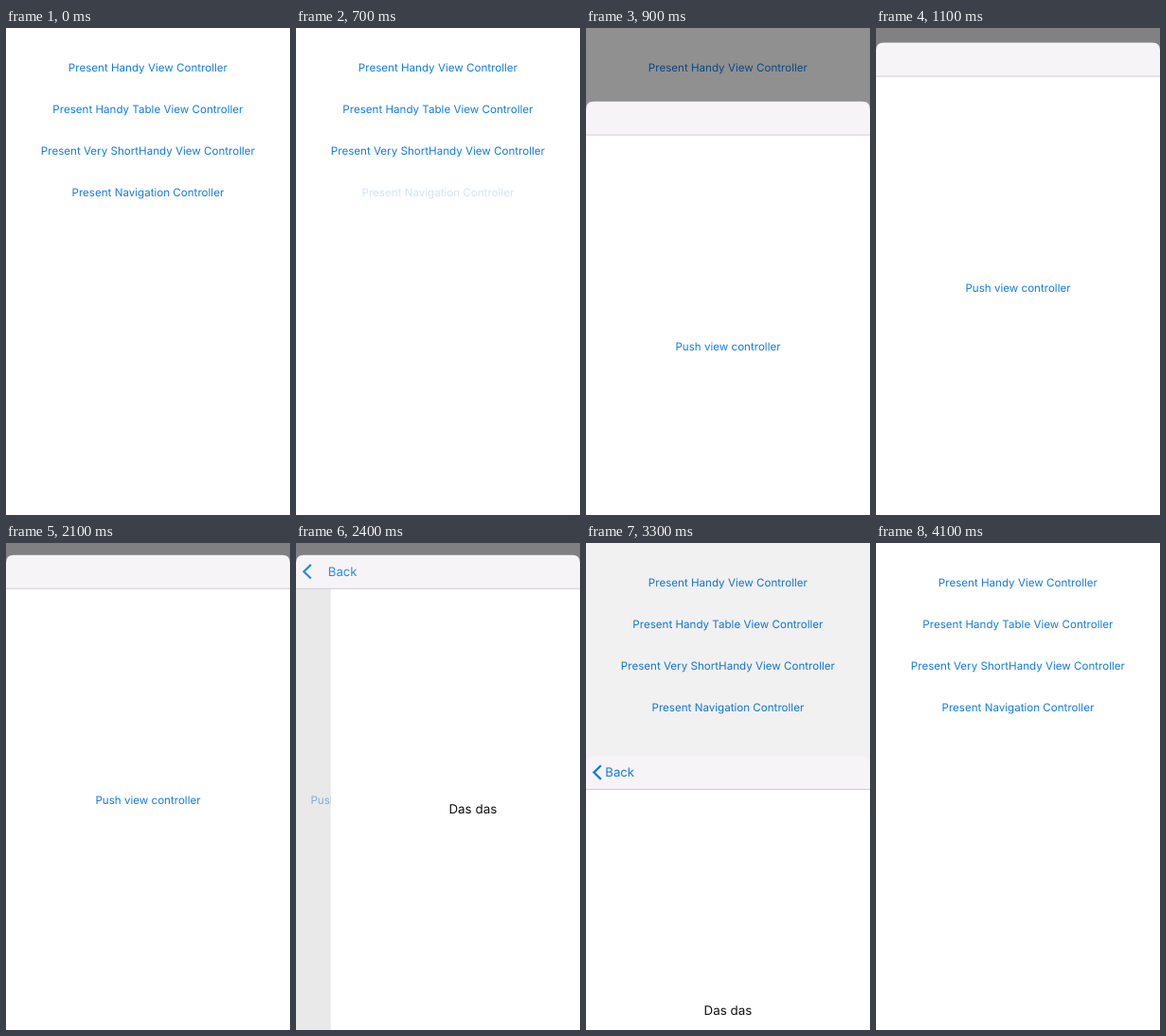
An HTML page for the animation above (4400 ms loop, 300 by 515 pixels).

```html
<!DOCTYPE html>
<html lang="en">
<head>
<meta charset="utf-8">
<title>Sheet presentation</title>
<style>
  html, body { margin: 0; width: 100%; height: 100%; overflow: hidden; background: #fff; }
  svg { display: block; width: 100%; height: 100%; }
  text { font: 11.6px Inter, "Liberation Sans", sans-serif; fill: #147ce0; text-rendering: geometricPrecision; }
  .link { text-anchor: middle; }
  #back { font-size: 13.2px; }
  #detail text { font-size: 13.4px; fill: #111; }
</style>
</head>
<body>
<svg viewBox="0 0 300 515">
  <rect width="300" height="515" fill="#fff"/>
  <text class="link" x="149.9" y="45.6">Present Handy View Controller</text>
  <text class="link" x="149.9" y="89.6">Present Handy Table View Controller</text>
  <text class="link" x="149.9" y="133.6">Present Very ShortHandy View Controller</text>
  <text class="link" x="149.9" y="177.6" id="present">Present Navigation Controller</text>
  <rect id="dim" width="300" height="515" fill="#020004"/>

  <g id="sheet">
    <path d="M0 540V8Q0 0 8 0H292Q300 0 300 8V540Z" fill="#f6f4f7"/>
    <rect y="35.8" width="300" height="504" fill="#fff"/>
    <g id="root">
      <text class="link" x="150" y="263.5" id="push">Push view controller</text>
    </g>
    <rect id="shade" y="35.8" width="300" height="504"/>
    <g id="detail">
      <rect y="35.8" width="300" height="504" fill="#fff"/>
      <text class="link" x="150" y="273.5">Das das</text>
    </g>
    <rect y="35" width="300" height="0.8" fill="#c6c4c8"/>
    <g id="backItem">
      <path d="M15.8 10.1L8.3 17.4L15.8 24.7" fill="none" stroke="#0b7ce6" stroke-width="2.2"/>
      <text id="back" y="22.3">Back</text>
    </g>
  </g>
</svg>
<script>
const LOOP = 4400, STEP = 100, WIDTH = 300, HEIGHT = 515, REST = 13;
const el = id => document.getElementById(id);
const move = (id, x, y) => el(id).setAttribute('transform', `translate(${x} ${y})`);
const fade = (id, alpha) => el(id).setAttribute('opacity', alpha);

// Critically damped spring: the share of the distance still to travel.
function remaining(t, start, rate) {
  const x = Math.max(0, t - start) / 1000 * rate;
  return (1 + x) * Math.exp(-x);
}

function sheetTop(t) {
  if (t < 3000) return REST - 0.2 + (HEIGHT - REST) * remaining(t, 709.4, 18.7);
  if (t < 3232) return REST + 47 * ((t - 3000) / 200) ** 2;   // dragged
  if (t < 3500) return HEIGHT - 455 * remaining(t, 3232, 18.7); // released
  return HEIGHT + 5;
}

function draw(t) {
  const top = sheetTop(t);
  const hidden = (top - REST) / (HEIGHT - REST);
  move('sheet', 0, top);
  fade('dim', 0.5 * Math.max(0, 1 - hidden * (t < 3000 ? 1 : 2.1)));
  fade('present', t < 700 ? 1 : Math.min(1, 0.2 + 0.35 * (t - 700) / 100));

  const away = remaining(t, 2180, 16.5);
  const pushed = 1 - away;
  move('root', -90 * pushed, 0);
  move('detail', WIDTH * away, 0);
  fade('push', t < 2200 ? 1 : 0.5);
  fade('shade', 0.1 * pushed);
  fade('backItem', pushed);
  el('back').setAttribute('x', 20.3 + 110 * away);
}

const start = performance.now();
function tick() {
  const t = (performance.now() - start + 16) % LOOP;
  draw(Math.floor(t / STEP) * STEP);
  requestAnimationFrame(tick);
}
tick();
</script>
</body>
</html>
```
